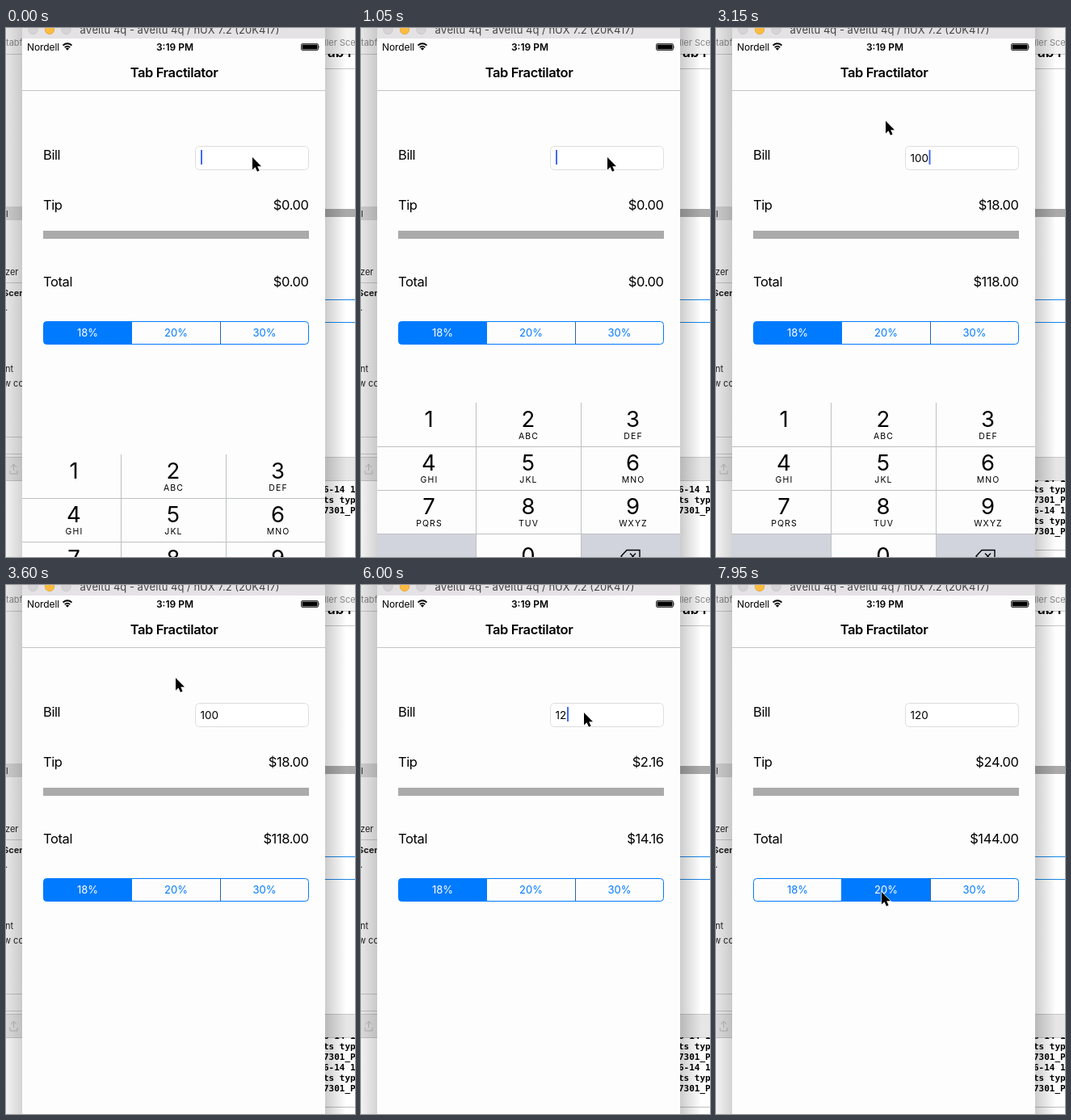
These frames come from a looping animation (432x655 px, 8 s). An HTML page:

```html
<!DOCTYPE html>
<html lang="en">
<head>
<meta charset="utf-8">
<title>Bill splitting demo</title>
<style>
  html, body { margin: 0; width: 100%; height: 100%; overflow: hidden; background: #fff; }
  svg { display: block; font-family: Inter, sans-serif; }
  .label { font-size: 16.5px; letter-spacing: -.4px; }
  .mid { text-anchor: middle; }
  .end { text-anchor: end; }
  .side { font-size: 11px; fill: #222; }
  .mono { font: bold 11px "DejaVu Sans Mono", monospace; }
</style>
</head>
<body>
<svg width="432" height="655" viewBox="0 0 432 655">
  <defs>
    <linearGradient id="shadeL"><stop stop-opacity=".05"/><stop offset="1" stop-opacity=".17"/></linearGradient>
    <linearGradient id="shadeR"><stop stop-opacity=".2"/><stop offset="1" stop-opacity="0"/></linearGradient>
    <clipPath id="consoleClip"><path d="M393 560h39v95h-39z"/></clipPath>
    <clipPath id="headClip"><path d="M393 32h39v10h-39z"/></clipPath>
  </defs>

  <!-- editor behind the phone -->
  <path fill="#fff" d="M0 0h432v655H0z"/>
  <path fill="#f3f3f3" d="M0 0h20v531H0zM395 0h37v32h-37z"/>
  <path fill="#d4d4d4" d="M0 221h20v17H0z"/>
  <path fill="#e6e6e6" d="M0 531h20v29H0zM395 531h37v29h-37z"/>
  <path fill="#aaa" d="M395 224h37v10h-37z"/>
  <path fill="none" stroke="#c8c8c8" d="M0 32.5h20M395 32.5h37M395 50.5h37M0 315.5h20M0 506.5h20M0 527.5h20M0 531.5h20M0 560.5h20M395 531.5h37M395 560.5h37"/>
  <path fill="none" stroke="#1a86e8" d="M395 336.5h37M395 364.5h37"/>
  <path fill="none" stroke="#bbb" d="M9.500 540v8M6 544l3.500-4 3.500 4M5 548v4h9v-4"/>
  <g class="side">
    <text x="0" y="22" fill="#888">tabf</text>
    <text x="394" y="22" fill="#888">ller Scen</text>
    <text x="0" y="234">l</text>
    <text x="-1" y="306">zer</text>
    <text x="-4" y="332" font-weight="700">Scen</text>
    <text x="-1" y="350">.</text>
    <text x="-1" y="426">nt</text>
    <text x="-3" y="444">w co</text>
  </g>
  <text x="388" y="36" font-size="17" font-weight="600" clip-path="url(#headClip)">Tab Fr</text>
  <g clip-path="url(#consoleClip)"><g id="console" class="mono"></g></g>
  <path id="consoleEdge" stroke="#c0c0c0" d="M395 646.500h37"/>
  <path fill="url(#shadeL)" d="M0 0h20v655H0z"/>
  <path fill="url(#shadeR)" d="M395 0h26v655h-26z"/>

  <!-- phone -->
  <path fill="#e4e2e4" d="M20 0h375v13H20z"/>
  <path fill="#fdfdfd" d="M20 13h375v642H20z"/>
  <g stroke-width=".7">
    <circle cx="33.500" cy="2" r="5.700" fill="#d5d3d5" stroke="#c4c2c4"/>
    <circle cx="54" cy="2" r="5.700" fill="#fdbc40" stroke="#e0a030"/>
    <circle cx="74.500" cy="2" r="5.700" fill="#d5d3d5" stroke="#c4c2c4"/>
  </g>
  <text class="mid" x="215" y="7" font-size="13" fill="#444">aVeltu 4q - aVeltu 4q / nUX 7.2 (20K417)</text>
  <text x="26" y="28" font-size="12" letter-spacing="-.1">Nordell</text>
  <g fill="none" stroke="#000" stroke-width="1.700">
    <path d="M70.500 21.500q5.500-4.500 11 0M72.700 24q3.300-2.600 6.600 0"/>
  </g>
  <path d="M73.800 25.300q2.200-1.600 4.400 0L76 27.800z"/>
  <text class="mid" x="209" y="28" font-size="12" font-weight="600">3:19 PM</text>
  <rect x="365.500" y="19.500" width="21" height="8" rx="1.500" stroke="#000" stroke-width=".8" fill="none"/>
  <path d="M366.500 20.500h19v6h-19zM387.500 22q1.500 1.500 0 3z"/>
  <text class="mid label" x="208" y="61" font-weight="600">Tab Fractilator</text>
  <path stroke="#c4c4c4" d="M20 77.500h375"/>

  <g class="label">
    <text x="46" y="163">Bill</text>
    <text x="46" y="225">Tip</text>
    <text x="46" y="320">Total</text>
    <text class="end" x="374.600" y="225" id="tip"></text>
    <text class="end" x="374.600" y="320" id="total"></text>
  </g>
  <rect x="234.500" y="146.500" width="140" height="29" rx="5" fill="#fff" stroke="#ddd"/>
  <text id="bill" x="240.500" y="165.500" font-size="13.500"></text>
  <rect id="caret" y="151" width="2" height="18" fill="#426bf2"/>
  <path fill="#aaa" d="M46 251h329v10H46z"/>
  <g id="segments" font-size="13"></g>
  <g id="keypad"></g>
  <path id="pointer" d="M0 0V15.500L3.500 12.300 6 17.800 8.600 16.600 6.200 11.300H11z" stroke="#fff" stroke-width="1.200" paint-order="stroke"/>
</svg>

<script>
const LOOP = 8000, STEP = 150;
const $ = id => document.getElementById(id);
const text = (x, y, s, attrs = '') => `<text x="${x}" y="${y}" ${attrs}>${s}</text>`;

// Tracks hold [time, value...] entries.
const BILL = [[0, ''], [1500, '1'], [1950, '10'], [2100, '100'], [5550, '10'], [5700, '1'], [6000, '12'], [6150, '120']];
const CARET = [[0, 1], [450, .5], [600, 0], [900, .5], [1050, 1], [2550, .5], [2700, 0], [3000, .5], [3150, 1], [3600, 0],
  [4500, 1], [5100, .5], [5250, 0], [5550, 1], [6600, .5], [6750, 0], [7050, .5], [7200, 1], [7650, .5], [7800, 0]];
const POINTER = [[0, 305, 160], [2250, 305, 160], [2850, 262, 152], [3000, 228, 126], [3150, 210, 115],
  [3750, 210, 115], [4350, 276, 158], [6450, 276, 158], [7500, 205, 380], [LOOP, 205, 380]];
const CARET_X = [241, 248, 255, 263.5];
const RATES = [18, 20, 30];
const SEGMENT_X = [46.5, 155.5, 265.5, 374.5];

const held = (track, t) => track.findLast(entry => entry[0] <= t)[1];

function pointerAt(t) {
  const i = POINTER.findLastIndex(p => p[0] <= t);
  const [t0, x0, y0] = POINTER[i], [t1, x1, y1] = POINTER[i + 1];
  const u = (t - t0) / (t1 - t0), k = u * u * (3 - 2 * u);
  return [x0 + (x1 - x0) * k, y0 + (y1 - y0) * k];
}

function buildKeypad() {
  const letters = ['', 'ABC', 'DEF', 'GHI', 'JKL', 'MNO', 'PQRS', 'TUV', 'WXYZ'];
  const centers = [84, 207, 336.5];
  const keys = letters.map((word, i) => {
    const x = centers[i % 3], y = 464 + 54 * Math.floor(i / 3);
    return text(x, y + 30, i + 1, 'class="mid" font-size="27.500"') +
      text(x + .5, y + 45, word, 'class="mid" font-size="10.500" letter-spacing="1.100"');
  }).join('');
  $('keypad').innerHTML = `<path fill="#fdfdfd" d="M20 464h375v216H20z"/>
    <path fill="#d1d4dc" d="M20 626h122v54H20zM273 626h122v54H273z"/>
    <path stroke="#bfc0c2" d="M142.500 464v216M272.500 464v216M20 518.500h375M20 572.500h375M20 626.500h375"/>
    ${keys}${text(207, 663, 0, 'class="mid" font-size="27.500"')}
    <path fill="none" stroke="#000" stroke-width="1.400" d="M322 654l7-7.500h16v15h-16zM333 650.500l7 7M340 650.500l-7 7"/>`;
}

function drawSegments(selected, pressed) {
  const [left, , , right] = SEGMENT_X;
  const fills = RATES.map((rate, i) => {
    const x = SEGMENT_X[i], w = SEGMENT_X[i + 1] - x, on = i === selected;
    const fill = on ? '#007aff' : i === pressed ? '#d5e8ff' : 'none';
    return `<rect x="${x}" y="363.500" width="${w}" height="28" rx="${i === 1 ? 0 : 3}" fill="${fill}"/>` +
      text(x + w / 2, 382, rate + '%', `class="mid" fill="${on ? '#fff' : '#007aff'}"`);
  }).join('');
  $('segments').innerHTML = `${fills}
    <path stroke="#007aff" d="M155.500 363v29"/><path stroke="#2a66a8" d="M265.500 363v29"/>
    <rect x="${left}" y="363.500" width="${right - left}" height="28" rx="4" fill="none" stroke="#007aff"/>`;
}

function drawConsole(scrolled) {
  const lines = ['6-14 1', 'ts typ', '7301_P'];
  const top = scrolled ? 562 : 575;
  $('console').innerHTML = Array.from({ length: scrolled ? 6 : 3 },
    (_, i) => text(393, top + 13 * i, lines[i % 3])).join('');
  $('consoleEdge').style.display = scrolled ? '' : 'none';
}

function draw(t) {
  const bill = held(BILL, t);
  const selected = t >= 7800 ? 1 : 0;
  const tip = bill * RATES[selected] / 100;
  $('bill').textContent = bill;
  $('tip').textContent = '$' + tip.toFixed(2);
  $('total').textContent = '$' + (+bill + tip).toFixed(2);
  $('caret').setAttribute('x', CARET_X[bill.length]);
  $('caret').setAttribute('opacity', held(CARET, t));
  $('pointer').setAttribute('transform', `translate(${pointerAt(t)})`);
  $('keypad').setAttribute('transform', `translate(0 ${64 * Math.max(0, 1 - t / 400) ** 3})`);
  $('keypad').style.display = t < 3600 ? '' : 'none';
  drawSegments(selected, t >= 7650 ? 1 : -1);
  drawConsole(t >= 2100);
}

buildKeypad();
const start = performance.now();
let shown = -1;
function tick() {
  const t = Math.floor((performance.now() - start) % LOOP / STEP) * STEP;
  if (t !== shown) draw(shown = t);
  requestAnimationFrame(tick);
}
tick();
</script>
</body>
</html>
```
